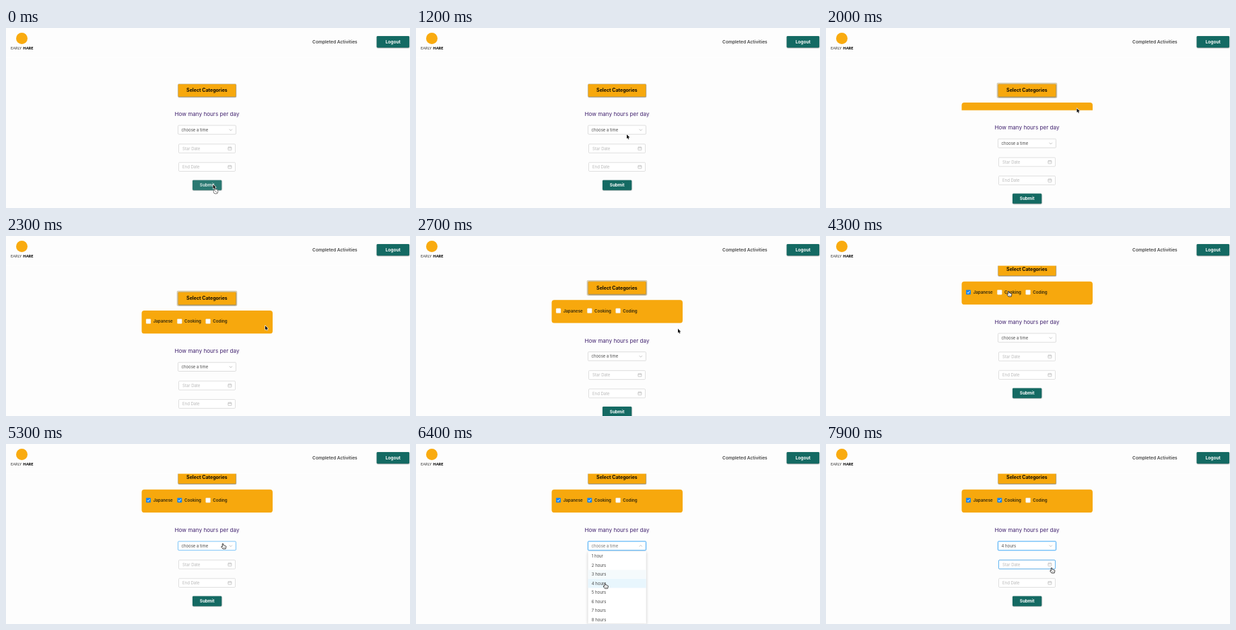
Recreate the animation shown at these times as an HTML page with a canvas. Size 600 px wide and 268 px high, loop 8 s.

```html
<!DOCTYPE html>
<html lang="en">
<head>
<meta charset="utf-8">
<title>Activity planner</title>
<style>
html, body { margin: 0; width: 100%; height: 100%; overflow: hidden; background: #fdfdfd; }
canvas { display: block; width: 600px; height: 268px; }
</style>
</head>
<body>
<canvas id="stage"></canvas>
<script>
const W = 600, H = 268, LOOP = 8000, STEP = 100;
const SANS = 'Inter, "Open Sans", sans-serif';
const TEAL = '#146a63', AMBER = '#f7a80d', BLUE = '#3fa9f5';
const LIST_TOP = 160.5, ROW = 13.45;

const cv = document.getElementById('stage');
const dpr = window.devicePixelRatio || 1;
cv.width = W * dpr;
cv.height = H * dpr;
const c = cv.getContext('2d');

const clamp = v => Math.max(0, Math.min(1, v));
const ramp = (t, a, b) => clamp((t - a) / (b - a));
const ease = p => p * p * (3 - 2 * p);
const easeOut = p => 1 - Math.pow(1 - p, 2.2);

// time, x, y of the hotspot, pointer kind from that time on
const path = [
  [0, 307.5, 233, 'blocked'],
  [700, 307.5, 233, 'blocked'],
  [900, 309, 222, 'arrow'],
  [1500, 317, 95, 'hand'],
  [1600, 318, 93, 'hand'],
  [1800, 322, 95, 'hand'],
  [1900, 346, 107, 'arrow'],
  [2000, 372.5, 119.5, 'arrow'],
  [2400, 389, 138, 'arrow'],
  [3000, 389, 138, 'arrow'],
  [3300, 227.5, 82, 'hand'],
  [3900, 227.5, 82, 'hand'],
  [4300, 271, 82, 'hand'],
  [4600, 271, 82, 'hand'],
  [4800, 285, 104, 'arrow'],
  [5200, 322, 148, 'hand'],
  [5800, 322, 148, 'hand'],
  [6200, 291, 176, 'hand'],
  [6300, 284, 193, 'hand'],
  [6400, 280.5, 207, 'hand'],
  [7100, 280.5, 207, 'hand'],
  [7300, 300, 199, 'arrow'],
  [7700, 335, 184, 'hand'],
  [LOOP, 335, 184, 'hand']
];

function pointer(t) {
  let i = 0;
  while (i < path.length - 2 && path[i + 1][0] <= t) i++;
  const [t0, x0, y0, kind] = path[i], [t1, x1, y1] = path[i + 1];
  const p = ramp(t, t0, t1);
  return { x: x0 + (x1 - x0) * p, y: y0 + (y1 - y0) * p, kind };
}

function box(x, y, w, h, r, fill, stroke, lw = 0.7) {
  c.beginPath();
  c.roundRect(x, y, w, h, r);
  if (fill) { c.fillStyle = fill; c.fill(); }
  if (stroke) { c.strokeStyle = stroke; c.lineWidth = lw; c.stroke(); }
}

function line(pts, color, lw) {
  c.beginPath();
  pts.forEach(([x, y], i) => i ? c.lineTo(x, y) : c.moveTo(x, y));
  c.strokeStyle = color;
  c.lineWidth = lw;
  c.stroke();
}

// y is the middle of the capitals
function text(s, x, y, size, color, weight = 400, align = 'left', family = SANS) {
  c.font = `${weight} ${size}px ${family}`;
  c.textAlign = align;
  c.fillStyle = color;
  c.fillText(s, x, y + size * 0.36);
}

function shadow(color, blur, dx, dy) {
  c.shadowColor = color;
  c.shadowBlur = blur * dpr;
  c.shadowOffsetX = dx * dpr;
  c.shadowOffsetY = dy * dpr;
}
const noShadow = () => shadow('transparent', 0, 0, 0);

function tealButton(label, x, y, w, h, size, lift) {
  shadow('rgba(0,0,0,.4)', 1.5, 0.2, 0.7);
  box(x, y, w, h, 1.4, lift ? '#2a7972' : TEAL);
  noShadow();
  text(label, x + w / 2, y + h / 2 - 0.2, size, lift ? '#d5e6e4' : '#fff', 700, 'center');
}

function header() {
  c.fillStyle = '#fdfdfd';
  c.fillRect(0, 0, W, 44.3);
  c.beginPath();
  c.arc(23.5, 15.5, 8.5, 0, 7);
  c.fillStyle = '#f9ab10';
  c.fill();
  const fam = 'Lato, sans-serif';
  text('EARLY', 7, 30, 5.6, '#333', 400, 'left', fam);
  text('HARE', 40.5, 30, 5.6, '#111', 900, 'right', fam);
  text('Completed Activities', 455, 20.6, 6.65, '#454545', 600);
  tealButton('Logout', 550.5, 12, 48.5, 17.2, 6.5, false);
}

function categoryButton(focus) {
  if (focus) box(254.2, 82, 88.6, 21.8, 1, '#f3dca6', '#c4bda9', 0.8);
  shadow('rgba(0,0,0,.5)', 1.2, 0.2, 0.8);
  box(255.6, 83.4, 86, 19, 1, AMBER);
  noShadow();
  box(255.6, 83.4, 86, 19, 1, null, 'rgba(165,155,130,.6)', 0.7);
  text('Select Categories', 298.4, 92.8, 7, '#0d0a05', 700, 'center');
}

function checkbox(x, y, label, on) {
  box(x, y - 3.5, 7, 7, 1, on ? '#1a86ee' : '#fff', on ? null : '#e3d6b8', 0.4);
  if (on) line([[x + 1.6, y + 0.1], [x + 3, y + 1.5], [x + 5.5, y - 1.6]], '#fff', 0.9);
  text(label, x + 10.7, y, 6.1, '#45340d', 700);
}

function panel(h, t) {
  c.save();
  c.beginPath();
  c.rect(200, 110, 200, 1 + h);
  c.clip();
  box(201.5, 111, 194.5, 34.5, 4, AMBER);
  checkbox(208, 127, 'Japanese', t >= 3600);
  checkbox(254.3, 127, 'Cooking', t >= 4500);
  checkbox(296.6, 127, 'Coding', false);
  c.restore();
}

function select(t) {
  const open = t >= 5700 && t < 7000, focus = t >= 5700, hover = t >= 5300;
  if (focus) box(255.5, 145, 86, 13.2, 1.5, null, 'rgba(24,144,255,.22)', 2);
  box(255.5, 145, 86, 13.2, 1.2, '#fff', hover ? BLUE : '#cfcfcf', focus ? 0.9 : 0.7);
  const done = t >= 7000;
  text(done ? '4 hours' : 'choose a time', 260.5, 151.6, 6, open ? '#777' : '#4c4c4c');
  const d = open ? -1.1 : 1.1;
  line([[331.7, 151.7 - d], [333.8, 151.7 + d], [335.9, 151.7 - d]], '#aaa', 0.7);
}

function dateField(label, y, glow) {
  box(256.5, y, 84, 13.2, 1.2, '#fff', '#d2d2d2');
  if (glow) {
    c.globalAlpha = glow;
    box(256.5, y, 84, 13.2, 1.2, null, BLUE, 0.8);
    c.globalAlpha = 1;
  }
  text(label, 262, y + 6.6, 6, '#b8b8b8');
  box(329.9, y + 4.6, 5, 4.4, 0.4, null, '#a9a9a9', 0.6);
  line([[329.9, y + 6.1], [334.9, y + 6.1]], '#a9a9a9', 0.5);
  line([[331.2, y + 3.8], [331.2, y + 5]], '#a9a9a9', 0.5);
  line([[333.6, y + 3.8], [333.6, y + 5]], '#a9a9a9', 0.5);
}

function rowAt(t) {
  const p = pointer(t);
  return p.y < LIST_TOP ? 0 : Math.floor((p.y - LIST_TOP) / ROW);
}

function list(t) {
  const show = t < 6900 ? ramp(t, 5600, 5900) : 1 - ramp(t, 6900, 7200);
  if (!show) return;
  c.save();
  c.globalAlpha = show;
  c.translate(0, LIST_TOP);
  c.scale(1, 0.8 + 0.2 * show);
  shadow('rgba(0,0,0,.22)', 4, 0, 1);
  box(255.5, -0.5, 86.3, 107.6, 1, '#fff');
  noShadow();
  const now = rowAt(t), last = rowAt(t - STEP);
  for (let i = 0; i < 8; i++) {
    const y = i * ROW;
    const bg = i === now ? '#e8f6fd' : i === last ? '#f5fafc' : null;
    if (bg) {
      c.fillStyle = bg;
      c.fillRect(255.5, y, 86.3, ROW);
    }
    text(`${i + 1} hour${i ? 's' : ''}`, 260.8, y + 6.7, 6, '#484848');
  }
  c.restore();
}

function arrow(x, y) {
  c.beginPath();
  [[0, 0], [0, 6.3], [1.4, 5], [2.4, 7.2], [3.4, 6.7], [2.5, 4.6], [4.4, 4.5]]
    .forEach(([a, b], i) => i ? c.lineTo(x + a, y + b) : c.moveTo(x + a, y + b));
  c.closePath();
  c.lineJoin = 'round';
  c.strokeStyle = '#fff';
  c.lineWidth = 1.1;
  c.stroke();
  c.fillStyle = '#111';
  c.fill();
}

function hand(x, y) {
  c.save();
  c.translate(x, y);
  c.lineJoin = 'round';
  c.beginPath();
  c.moveTo(-0.8, 0.7);
  c.quadraticCurveTo(0, -0.5, 0.8, 0.7);
  c.lineTo(1, 3);
  c.quadraticCurveTo(2, 2.4, 2.5, 3.3);
  c.quadraticCurveTo(3.5, 2.8, 3.9, 3.8);
  c.quadraticCurveTo(5, 3.6, 4.9, 5);
  c.lineTo(4.2, 8.1);
  c.lineTo(0, 8.1);
  c.lineTo(-2.4, 5);
  c.quadraticCurveTo(-2.2, 3.7, -0.6, 4.9);
  c.closePath();
  c.fillStyle = '#fff';
  c.fill();
  c.strokeStyle = '#222';
  c.lineWidth = 0.85;
  c.stroke();
  line([[1.2, 5.4], [1.2, 7]], '#444', 0.5);
  line([[2.6, 5.4], [2.6, 7]], '#444', 0.5);
  c.restore();
}

function blocked(x, y) {
  c.beginPath();
  c.arc(x, y, 3.4, 0, 7);
  c.fillStyle = '#fff';
  c.fill();
  c.strokeStyle = '#777';
  c.lineWidth = 1;
  c.stroke();
  line([[x - 2.3, y - 2.3], [x + 2.3, y + 2.3]], '#777', 0.9);
}

function draw(t) {
  const p = pointer(t);
  const grow = 34.5 * ease(ramp(t, 1865, 2215));
  const shift = grow ? 8.7 + grow : 0;
  const scroll = 43.2 * easeOut(ramp(t, 2580, 3230));

  c.setTransform(dpr, 0, 0, dpr, 0, 0);
  c.fillStyle = '#fdfdfd';
  c.fillRect(0, 0, W, H);

  c.save();
  c.translate(0, -scroll);
  categoryButton(t >= 1700 && t < 3600);
  if (grow) panel(grow, t);
  c.translate(0, shift);
  text('How many hours per day', 298.5, 128.1, 8.15, '#41226f', 400, 'center');
  select(t);
  dateField('Star Date', 172.8, ramp(t, 7700, 7900));
  dateField('End Date', 200.2, 0);
  tealButton('Submit', 277, 226.4, 43.3, 15, 6.3, t < 900);
  c.restore();

  list(t);
  header();
  if (p.kind === 'hand') hand(p.x, p.y);
  else arrow(p.x, p.y);
  if (p.kind === 'blocked') blocked(p.x + 4, p.y + 10.5);
}

function tick(now) {
  const t = now % LOOP;
  draw(Math.floor(t / STEP) * STEP);
  requestAnimationFrame(tick);
}
requestAnimationFrame(tick);
</script>
</body>
</html>
```
